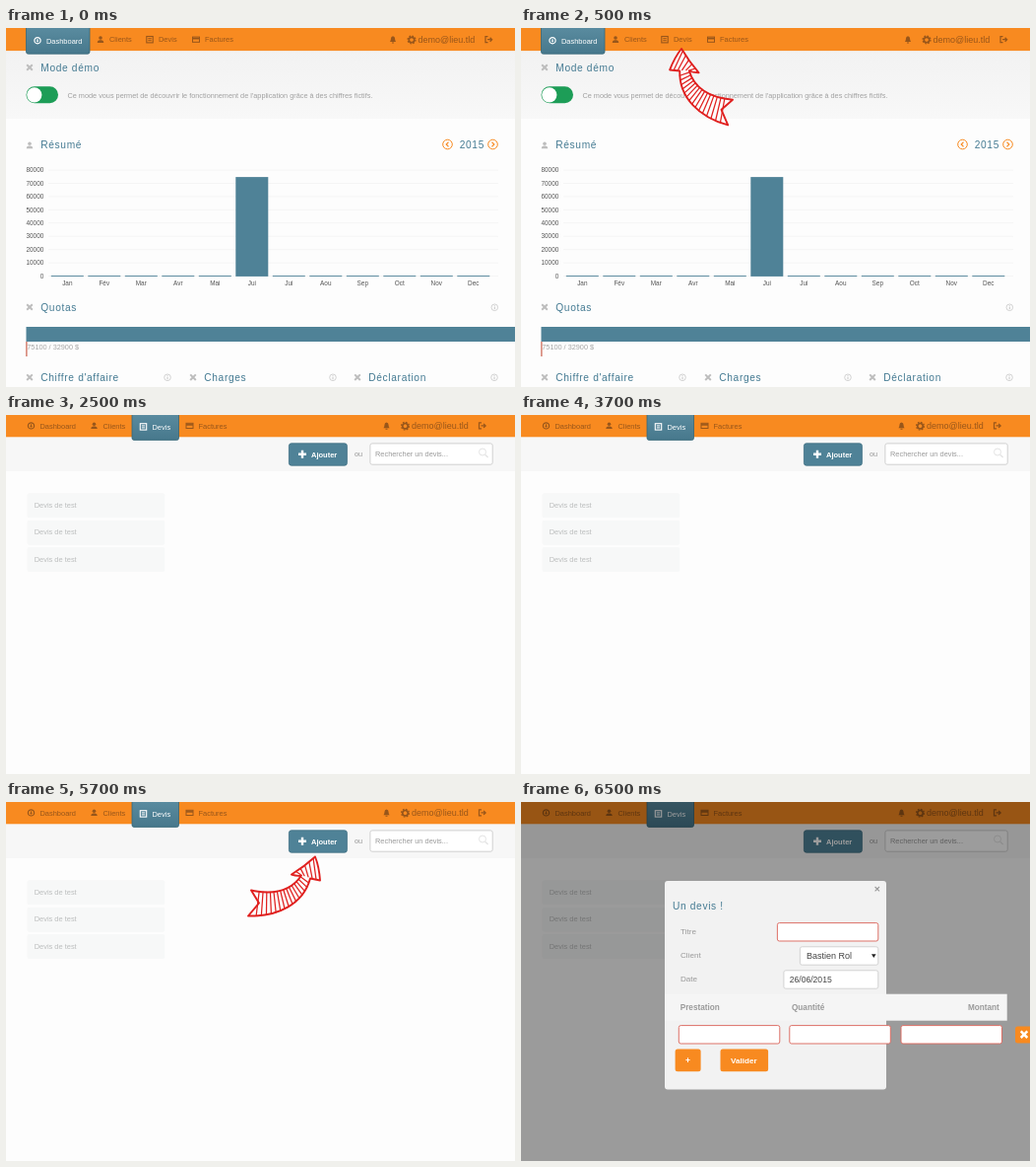
An HTML page for the animation above (8 s loop, 517 by 364 pixels).

```html
<!DOCTYPE html>
<html lang="fr">
<head>
<meta charset="utf-8">
<title>Devis</title>
<style>
  html, body { margin: 0; width: 100%; height: 100%; overflow: hidden; background: #fdfdfd; }
  svg { display: block; width: 517px; height: 364px; font-family: "Liberation Sans", Arial, sans-serif; }
</style>
</head>
<body>
<svg id="stage" viewBox="0 0 517 364" xmlns="http://www.w3.org/2000/svg"></svg>
<script>
const BLUE = '#4f8297', ORANGE = '#f88a20', BROWN = '#98561a', RED = '#e0201f', GREY = '#bdbdbd';

const rect = (x, y, w, h, fill, more = '') =>
  `<rect x="${x}" y="${y}" width="${w}" height="${h}" fill="${fill}" ${more}/>`;
const text = (x, y, str, size, fill, more = '') =>
  `<text x="${x}" y="${y}" font-size="${size}" fill="${fill}" ${more}>${str}</text>`;
const line = (d, stroke, width = 1, more = '') =>
  `<path d="${d}" fill="none" stroke="${stroke}" stroke-width="${width}" ${more}/>`;
const group = (content, attrs) => `<g ${attrs}>${content}</g>`;
const at = (x, y, content) => group(content, `transform="translate(${x} ${y})"`);
const bold = 'font-weight="bold"';
const middle = 'text-anchor="middle"';

const heading = (x, y, str) => text(x, y, str, 10.2, '#447a92', 'letter-spacing=".65"');
const cross = (x, y, r = 2.8, color = GREY, w = 2) =>
  line(`M${x - r} ${y - r}l${2 * r} ${2 * r}m0 ${-2 * r}l${-2 * r} ${2 * r}`, color, w);
const plus = (x, y) => line(`M${x - 4} ${y}h8M${x} ${y - 4}v8`, '#fff', 2.4);
const info = (x, y) => at(x, y,
  `<circle r="3.3" fill="none" stroke="#c8c8c8" stroke-width=".8"/>` + line('M0 -2v1M0 -.4v2.3', '#c0c0c0', .9));
const person = (x, y, color) => at(x, y,
  `<circle cy="-1.7" r="1.8" fill="${color}"/><path d="M-3.3 3.2Q-3.2 .8 -1 .5H1Q3.2 .8 3.3 3.2Z" fill="${color}"/>`);

// Navigation icons, drawn around their centre
const icons = [
  c => `<circle r="3.1" fill="none" stroke="${c}" stroke-width="1.2"/>` + line('M0 -1.6V1.6M-1 .6H1', c),
  c => person(0, 0, c),
  c => rect(-3.2, -3.2, 6.4, 6.4, 'none', `stroke="${c}" stroke-width="1.1"`) + line('M-1.7 -1H1.7M-1.7 1H1.7', c),
  c => rect(-3.5, -2.6, 7, 5.2, 'none', `stroke="${c}"`) + line('M-3.5 -1H3.5', c, 1.6)
];
const tabs = [['Dashboard', 32, 20.5, 64.5], ['Clients', 96, 0, 0], ['Devis', 146, 134.5, 47.5], ['Factures', 193, 0, 0]];

function nav(active, dx, dy) {
  let out = rect(0, 0, 517, 22.7 + dy, ORANGE);
  let items = '';
  tabs.forEach(([name, x, left, width], i) => {
    const on = i === active, color = on ? '#fff' : BROWN;
    if (on) items += rect(left, -3, width, 28.8, 'url(#tab)', 'stroke="#376779" stroke-width=".8" rx="2"');
    items += at(x, on ? 12.3 : 11.3, icons[i](color)) + text(x + 9, on ? 15.2 : 14, name, 7.45, color);
  });
  items += at(393, 11.2, `<path d="M-3 2.4Q-2 1-2-1Q-2-3 0-3.4Q2-3 2-1Q2 1 3 2.4ZM-1 3H1V4H-1Z" fill="${BROWN}"/>`);
  items += at(412, 11.6, `<circle r="2.7" fill="none" stroke="${BROWN}" stroke-width="1.7"/>` +
    `<circle r="3.9" fill="none" stroke="${BROWN}" stroke-width="1.3" stroke-dasharray="1.6 1.46"/>`);
  items += text(418.6, 14.6, 'demo@lieu.tld', 9, BROWN);
  items += at(490, 11.3, line('M-.5 -3H-3V3H-.5', BROWN, 1.2) + line('M-1 0H3.5M1.6 -2L3.6 0L1.6 2', BROWN, 1.3));
  return out + at(dx, dy, items);
}

function chart() {
  const months = ['Jan', 'Fév', 'Mar', 'Avr', 'Mai', 'Jui', 'Jui', 'Aou', 'Sep', 'Oct', 'Nov', 'Dec'];
  let out = '';
  for (let i = 0; i <= 8; i++) {
    const y = 251.5 - i * 13.43;
    out += line(`M43 ${y}H500`, '#f5f5f5') +
      text(38.3, y + 2.2, i ? i * 10000 : 0, 6.4, '#555', 'text-anchor="end"');
  }
  months.forEach((m, i) => {
    const x = 62.3 + i * 37.5, h = i === 5 ? 100.8 : .9;
    out += rect(x - 16.5, 251.9 - h, 33, h, BLUE) + text(x, 261, m, 6.4, '#555', middle);
  });
  return out;
}

function dashboard() {
  const arrowButton = (x, dir) => at(x, 118, `<circle r="4.8" fill="none" stroke="${ORANGE}" stroke-width="1"/>` +
    line(`M${-dir} -2.3L${1.3 * dir} 0L${-dir} 2.3`, ORANGE, 1.2));
  let out = rect(0, 0, 517, 364, '#fdfdfd') + rect(0, 22, 517, 70, 'url(#band)') + nav(0, 0, .4);
  out += cross(24, 40) + heading(35.3, 43.6, 'Mode démo');
  out += rect(20.5, 59.3, 32.5, 17, '#1d9d57', 'rx="8.5"') + '<circle cx="28.8" cy="67.8" r="7.6" fill="#fff"/>';
  out += text(62.5, 70.8, "Ce mode vous permet de découvrir le fonctionnement de l'application grâce à des chiffres fictifs.", 7.3, '#a0a0a0');
  out += person(24, 119, GREY) + heading(35.3, 122.3, 'Résumé');
  out += arrowButton(448.5, -1) + heading(460.7, 122.3, '2015') + arrowButton(494.5, 1) + chart();
  out += cross(24, 283) + heading(35.3, 286.7, 'Quotas') + info(496.3, 283.3);
  out += rect(20.5, 303, 497, 15, BLUE) + rect(20.3, 318, 1.2, 15, '#c9604c');
  out += text(21.3, 326.3, '75100 / 32900 $', 7.3, '#a5a5a5');
  [["Chiffre d'affaire", 24, 164], ['Charges', 190, 332], ['Déclaration', 357, 496]].forEach(([name, x, end]) => {
    out += cross(x, 354.2) + heading(x + 11.3, 357.9, name) + info(end, 354.3);
  });
  return out;
}

function quotes() {
  let out = rect(0, 0, 517, 364, '#fdfdfd') + rect(0, 22, 517, 35, '#f7f7f7') + nav(2, -6.5, -.4);
  out += rect(287.4, 28.8, 59, 22.4, BLUE, 'rx="2.5" stroke="#3f7083" stroke-width=".8"');
  out += plus(301, 39.8) + text(310, 42.6, 'Ajouter', 7.5, '#fff', bold) + text(354, 42.3, 'ou', 7.4, '#999');
  out += rect(369.9, 28.9, 124.3, 21.3, '#fff', 'rx="2" stroke="#ccc" stroke-width=".9"');
  out += text(375, 42.3, 'Rechercher un devis...', 7.4, '#999');
  out += '<circle cx="484" cy="37.5" r="3.5" fill="none" stroke="#e4e4e4"/>' + line('M486.6 40.2L489.6 43', '#e4e4e4', 1.3);
  for (const y of [79.3, 106.7, 134.1])
    out += rect(21.5, y, 139.7, 25, '#f7f8f8', 'rx="2"') + text(28.7, y + 14.7, 'Devis de test', 7.45, '#bcbebe');
  return out;
}

function dialog() {
  const field = (x, y, w, stroke = '#dc6a60') => rect(x, y, w, 18.4, '#fff', `rx="2" stroke="${stroke}" stroke-width=".95"`);
  const button = (x, y, w, h) => rect(x, y, w, h, ORANGE, 'rx="2.5"');
  let out = rect(0, 0, 517, 364, '#000', 'opacity=".39"');
  out += rect(146, 80, 225, 211.5, '#f2f2f2', 'rx="3"') + cross(361.8, 88.2, 2.2, '#999', 1.1);
  out += heading(154, 108.7, 'Un devis !');
  ['Titre', 'Client', 'Date'].forEach((name, i) => out += text(162, 134.4 + i * 24, name, 8.1, '#9a9a9a'));
  out += field(260.4, 122.6, 102.4) + field(283.4, 146.8, 79.4, '#d0d0d0') + field(266.9, 170.8, 95.9, '#d0d0d0');
  out += text(290, 159, 'Bastien Rol', 9, '#444') + '<path d="M356 154.3h4.6l-2.3 3.8z" fill="#222"/>';
  out += text(272.7, 183.1, '26/06/2015', 8.6, '#444');
  out += rect(146, 194.7, 347.7, 27, '#f5f5f5');
  [['Prestation', 161.7], ['Quantité', 275], ['Montant', 454]].forEach(([name, x]) =>
    out += text(x, 211, name, 8.2, '#9a9a9a', bold));
  for (const x of [160.3, 272.8, 386]) out += field(x, 226.6, 102.5);
  out += button(502, 227.5, 20, 17) + cross(511, 235.7, 3.3, '#fff', 2.5);
  out += button(156.6, 250.6, 26, 22.6) + text(169.6, 264.6, '+', 8.5, '#fff', bold + middle.padStart(middle.length + 1));
  out += button(202.5, 250.6, 48.6, 22.6) + text(213, 264.7, 'Valider', 8.1, '#fff', bold);
  return out;
}

// Hand-drawn arrow with its tip at the origin
function arrow(transform) {
  const inner = [[-14, 19], [-24, 34], [-42, 39], [-65, 34]];
  const outer = [[-5, 22], [-12, 48], [-38, 61], [-68, 60]];
  const curve = (p, t) => [0, 1].map(k => (1 - t) ** 3 * p[0][k] + 3 * t * (1 - t) ** 2 * p[1][k] +
    3 * t * t * (1 - t) * p[2][k] + t ** 3 * p[3][k]);
  let hatch = '';
  for (let i = 0; i < 15; i++) {
    const t = .03 + i / 16.5;
    hatch += `M${curve(inner, t)}L${curve(outer, Math.min(1, t + .03))}`;
  }
  for (let i = 0; i < 5; i++) hatch += `M${-19 + i * 4.3} ${15.3 - i * 3.2}L${-15 + i * 4} ${18 + i * 1.2}`;
  const outline = `M0 0Q-11 10 -24 18Q-18 20 ${inner.join(' C').replace(/ C/, 'C')} ` +
    `L-57 47L${outer[3]}C${outer[2]} ${outer[1]} ${outer[0]}L5 24Q4 10 0 0Z`;
  return group(`<path d="${outline.replace(/ C/g, ' ')}" fill="#fdfdfd" stroke="${RED}" stroke-width="1.9" stroke-linejoin="round"/>` +
    line(hatch, RED, 1.25, 'stroke-linecap="round"'), `transform="${transform}"`);
}

const gradient = (id, top, bottom) => `<linearGradient id="${id}" x2="0" y2="1">` +
  `<stop stop-color="${top}"/><stop offset="1" stop-color="${bottom}"/></linearGradient>`;

// Each layer is visible from its start to its end time
const layers = [
  [dashboard(), 0, 2500],
  [arrow('matrix(-.955 -.296 -.296 .955 163 21)'), 500, 2500],
  [quotes(), 2500, 8000],
  [arrow('translate(314 55.5)'), 4500, 6500],
  [dialog(), 6500, 8000]
];
const stage = document.getElementById('stage');
stage.innerHTML = `<defs>${gradient('band', '#f2f2f2', '#f8f8f8')}${gradient('tab', '#5b8da1', '#47788c')}</defs>` +
  layers.map(([content]) => group(content, 'class="layer"')).join('');
const nodes = stage.querySelectorAll('.layer');

function draw() {
  const t = performance.now() % 8000;
  layers.forEach(([, from, to], i) => nodes[i].style.display = t >= from && t < to ? '' : 'none');
  requestAnimationFrame(draw);
}
draw();
</script>
</body>
</html>
```
